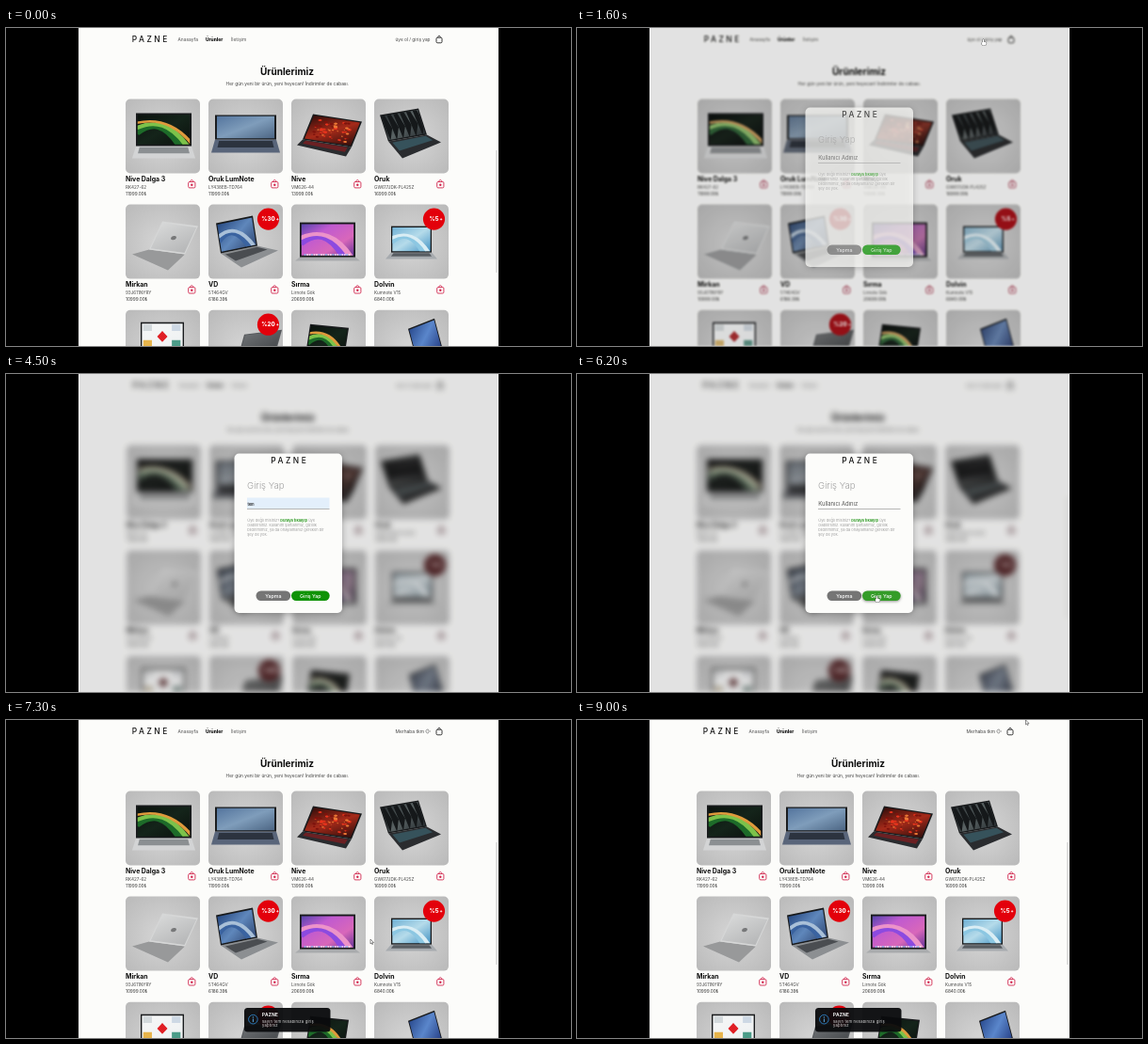
Animation of 600 by 338 pixels, one loop 10 s. Source, as an HTML page with a canvas:

```html
<!DOCTYPE html>
<html lang="tr">
<head>
<meta charset="utf-8">
<title>Ürünlerimiz</title>
<style>
html, body { margin: 0; width: 100%; height: 100%; overflow: hidden; background: #000; }
canvas { display: block; width: 600px; height: 338px; }
</style>
</head>
<body>
<canvas id="stage" width="600" height="338"></canvas>
<script>
const W = 600, H = 338, LOOP = 10000, STEP = 100;
const LEFT = 77, RIGHT = 523, PAPER = '#fcfcfa', INK = '#0c0c0c';
const BRAND = 'PAZNE', USER = 'tkm';
const view = document.getElementById('stage').getContext('2d');
const sheet = document.createElement('canvas');
sheet.width = W;
sheet.height = H;
const page = sheet.getContext('2d');

const clamp = v => Math.max(0, Math.min(1, v));
const ramp = (t, a, b) => clamp((t - a) / (b - a));
const smooth = u => u * u * (3 - 2 * u);
const easeOut = u => 1 - (1 - u) * (1 - u);
const mix = (a, b, u) => a + (b - a) * u;

function random(seed) {
  return () => (seed = seed * 16807 % 2147483647) / 2147483647;
}

function text(c, s, x, y, size, color, weight = 400, align = 'left', gap = 0) {
  c.font = `${weight} ${size}px Inter, sans-serif`;
  c.letterSpacing = gap + 'px';
  c.textAlign = align;
  c.fillStyle = color;
  c.fillText(s, x, y);
  const w = c.measureText(s).width;
  c.letterSpacing = '0px';
  return w;
}

function box(c, x, y, w, h, r, fill) {
  c.beginPath();
  c.roundRect(x, y, w, h, r);
  c.fillStyle = fill;
  c.fill();
}

function disc(c, x, y, r, fill) {
  c.beginPath();
  c.arc(x, y, r, 0, 7);
  c.fillStyle = fill;
  c.fill();
}

function poly(c, pts, fill) {
  c.beginPath();
  pts.forEach(([x, y]) => c.lineTo(x, y));
  c.closePath();
  c.fillStyle = fill;
  c.fill();
}

// Screen art is drawn in a unit square that the lid's transform places.
const swoosh = (...colors) => c => colors.forEach((color, i) => {
  c.beginPath();
  c.moveTo(0, 0.62 - i * 0.16);
  c.quadraticCurveTo(0.45 + i * 0.08, 0.05, 0.8 + i * 0.12, 1);
  c.strokeStyle = color;
  c.lineWidth = 0.15 - i * 0.04;
  c.stroke();
});

const embers = c => {
  const rnd = random(11);
  for (let i = 0; i < 60; i++) {
    const x = mix(rnd(), 0.5, 0.3), y = mix(rnd(), 0.5, 0.3);
    disc(c, x, y, 0.01 + rnd() * 0.035, ['#e8331c', '#7d120c', '#ee7a35'][i % 3]);
  }
};

const shards = c => {
  for (let i = 0; i < 6; i++) {
    const x = i / 6;
    poly(c, [[x, 0], [x + 0.1, 0], [x + 0.2, 0.55], [x + 0.06, 1]], '#15181a');
  }
};

const tiles = c => {
  const colors = ['#d3d9dc', '#cdd8e4', '#e7b44b', '#4b9c88'];
  colors.forEach((color, i) => box(c, 0.06 + i % 2 * 0.66, 0.08 + (i >> 1) * 0.5, 0.2, 0.2, 0, color));
  poly(c, [[0.5, 0.28], [0.62, 0.46], [0.5, 0.64], [0.38, 0.46]], '#e01f25');
};

const dock = c => {
  swoosh('#8c4ae0', '#ec93c9')(c);
  for (let i = 0; i < 20; i++) box(c, 0.08 + i * 0.042, 0.91, 0.03, 0.06, 0, i % 3 ? '#f2edf5' : '#7fc5ef');
};

const badge = c => disc(c, 0.5, 0.5, 0.07, '#777879');

/* x, y: left end of the hinge; w, turn: hinge vector; h, lean: lid vector;
   deck: vector to the front edge, which is wider by flare and drops by dip. */
function laptop(c, { x, y, w, h, turn = 0, lean = 0, deck, flare = 0, dip = 0,
  metal = '#2a2c2f', keys, edge = '#181a1c', screen, art, rim = 0.03 }) {
  if (deck) {
    const [dx, dy] = deck;
    const front = [[x + w + dx + flare, y + turn + dy + dip], [x + dx - flare, y + dy]];
    const back = [[x, y], [x + w, y + turn]];
    const at = (u, v) => [0, 1].map(k =>
      mix(mix(back[0][k], back[1][k], u), mix(front[1][k], front[0][k], u), v));
    poly(c, [...back, ...front], metal);
    if (keys) poly(c, [at(0.07, 0.1), at(0.93, 0.1), at(0.93, 0.6), at(0.07, 0.6)], keys);
  }
  c.save();
  c.transform(w, turn, -lean, h, x + lean, y - h);
  c.fillStyle = edge;
  c.fillRect(0, 0, 1, 1);
  c.beginPath();
  c.rect(rim, rim * 1.6, 1 - 2 * rim, 1 - 3.2 * rim);
  c.clip();
  const g = c.createLinearGradient(0, 0, 1, 1);
  screen.forEach((color, i) => g.addColorStop(i / (screen.length - 1), color));
  c.fillStyle = g;
  c.fillRect(0, 0, 1, 1);
  if (art) art(c);
  c.restore();
}

const night = ['#0b110d', '#14241a', '#0b0f0c'];
const green = swoosh('#1d6b29', '#7cc24a', '#e09a3c');

const goods = [
  { name: 'Nive Dalga 3', model: 'RK427-62', price: '11999.00₺',
    pc: { x: 11, y: 50, w: 59, h: 35, deck: [0, 13], flare: 4, metal: '#d3d4d5', keys: '#8b8f92', screen: night, art: green } },
  { name: 'Oruk LumNote', model: 'LY438EB-TD764', price: '11999.00₺',
    pc: { x: 7, y: 43, w: 65, h: 26, deck: [0, 14], flare: 4, metal: '#59657a', keys: '#2c333f', screen: ['#50719b', '#7f9dbb', '#48617f'] } },
  { name: 'Nive', model: 'VM626-44', price: '13999.00₺',
    pc: { x: 12, y: 43, w: 52, turn: 8, h: 27, lean: 11, deck: [-6, 6], dip: 4, keys: '#6b2023', screen: ['#2b0c0a', '#a52a19', '#2a0d0c'], art: embers } },
  { name: 'Oruk', model: 'GW617JDK-PL425Z', price: '16999.00₺',
    pc: { x: 15, y: 45, w: 41, turn: -7, h: 28, lean: -9, deck: [15, 18], dip: -10, keys: '#36525b', screen: ['#23292c', '#596263', '#262c30'], art: shards } },
  { name: 'Mirkan', model: '93J611NYRY', price: '10999.00₺',
    pc: { x: 25, y: 48, w: 38, turn: 5, h: 30, lean: 14, deck: [-18, 5], dip: 12, metal: '#98999a', edge: '#d6d7d7', screen: ['#d8d9d9', '#b4b5b6'], art: badge } },
  { name: 'VD', model: '5T464GV', price: '6186.39₺', sale: '%30',
    pc: { x: 13, y: 52, w: 39, turn: -8, h: 32, lean: -5, deck: [22, 15], dip: -10, metal: '#8c8f92', keys: '#4a4d51', screen: ['#24467f', '#5f87bb', '#2d4470'], art: tiles && swoosh('#3a63a0', '#a9c0d8') } },
  { name: 'Sırma', model: 'Lirnote Gök', price: '20699.00₺',
    pc: { x: 9, y: 56, w: 59, h: 37, deck: [0, 4], flare: 5, metal: '#a9abad', screen: ['#4b43a8', '#c05ad0', '#d867ba', '#5b2f95'], art: dock } },
  { name: 'Dolvin', model: 'Kumnote V15', price: '6840.00₺', sale: '%5',
    pc: { x: 18, y: 51, w: 43, h: 28, deck: [0, 7], flare: 6, metal: '#a7abaf', keys: '#585d62', screen: ['#6caed3', '#b5dbea', '#3d8fc2'], art: swoosh('#8cc7e2', '#d9edf4') } },
  { pc: { x: 16, y: 46, w: 46, h: 33, screen: ['#f6f7f7', '#eef1f2'], art: tiles } },
  { sale: '%20', pc: { x: 32, y: 48, w: 40, turn: -5, h: 22, lean: 6, edge: '#55585b', screen: ['#6d7073', '#45484b'] } },
  { pc: { x: 15, y: 48, w: 41, turn: 4, h: 33, lean: 5, screen: night, art: green } },
  { pc: { x: 44, y: 50, w: 28, turn: -11, h: 30, lean: -8, screen: ['#28488b', '#5a86cb', '#263f85'] } }
];

function bag(c, x, y, w, h, color) {
  c.strokeStyle = color;
  c.lineWidth = 0.9;
  c.beginPath();
  c.roundRect(x, y, w, h, 1.2);
  c.moveTo(x + w * 0.28, y);
  c.bezierCurveTo(x + w * 0.28, y - 2.6, x + w * 0.72, y - 2.6, x + w * 0.72, y);
  c.stroke();
}

function card(c, { name, model, price, sale, pc }, i) {
  c.save();
  c.translate(127 + i % 4 * 88, 75.5 + Math.floor(i / 4) * 112.1);
  const g = c.createRadialGradient(39, 42, 8, 39, 40, 56);
  g.addColorStop(0, '#d2d2d2');
  g.addColorStop(1, '#b9b9b9');
  box(c, 0, 0, 79, 79, 5, g);
  c.save();
  c.beginPath();
  c.rect(0, 0, 79, 79);
  c.clip();
  laptop(c, pc);
  c.restore();
  if (sale) {
    disc(c, 63.5, 15.5, 11.6, '#e3000b');
    const wide = text(c, sale, 63.5, 17.6, 6, '#fff', 800, 'center', 0.1);
    text(c, '+', 64.5 + wide / 2, 17.4, 4.6, '#fff', 800);
  }
  if (name) {
    text(c, name, 0, 87.6, 6.9, INK, 700);
    text(c, model, 0, 95.4, 4.6, '#444');
    text(c, price, 0, 102.3, 4.7, '#333');
    bag(c, 66.7, 88, 7.2, 6.4, '#d2274f');
    disc(c, 70.3, 91.2, 1.2, '#d2274f');
  }
  c.restore();
}

function drawPage(t) {
  const c = page;
  const locked = t >= 1500 && t < 6200;
  c.fillStyle = PAPER;
  c.fillRect(0, 0, W, H);
  c.save();
  c.translate(locked ? 1 : 0, 0);
  text(c, BRAND, 133.8, 15.2, 8.4, '#151515', 500, 'left', 2.5);
  text(c, 'Anasayfa', 182.5, 14.2, 4.9, '#555');
  text(c, 'Ürünler', 212, 14.2, 4.9, INK, 800);
  text(c, 'İletişim', 239, 14.2, 4.9, '#555');
  if (t >= 6400) {
    text(c, 'Merhaba ' + USER, 413.5, 14.2, 4.9, '#444');
    c.strokeStyle = '#555';
    c.lineWidth = 0.6;
    c.beginPath();
    c.arc(447.8, 12, 1.9, 0.9, 5.4);
    c.moveTo(447.8, 12);
    c.lineTo(451, 12);
    c.stroke();
  } else {
    text(c, 'üye ol / giriş yap', 413.5, 14.2, 4.75, '#444');
  }
  bag(c, 457, 10.2, 6, 5.6, '#222');
  text(c, 'Ürünlerimiz', 298.5, 49.9, 10, INK, 700, 'center');
  text(c, 'Her gün yeni bir ürün, yeni heyecan! İndirimler de cabası.', 298.8, 60.5, 4.85, '#444', 400, 'center');
  goods.forEach((item, i) => card(c, item, i));
  c.restore();
  if (!locked) box(c, 520.5, 130, 1, 130, 0.5, '#c4c4c4');
}

function drawField(c, t) {
  if (t >= 4200 && t < 5900) {
    const picked = t >= 4800;
    c.fillStyle = '#e3effb';
    c.fillRect(256, 131.5, 87.5, 11.5);
    text(c, USER, 256.5, 139.5, picked ? 5.8 : 3.9, '#222', picked ? 400 : 600);
  } else {
    text(c, 'Kullanıcı Adınız', 256.2, 139.6, 5.9, '#555');
    const blink = t >= 3300 && t < 3500;
    if (t >= 2600 && t < 4200 && !blink) box(c, 256, 133.5, 0.8, 7.5, 0, '#222');
  }
  c.fillStyle = '#999';
  c.fillRect(256, 143, 87.5, 0.7);
}

function button(c, label, x, w, fill, raised) {
  c.save();
  if (raised) {
    c.shadowColor = 'rgba(0,0,0,.4)';
    c.shadowBlur = 3;
    c.shadowOffsetY = 1;
  }
  box(c, x, 230.5, w, 10.5, 5.2, fill);
  c.restore();
  text(c, label, x + w / 2, 237.8, 5.3, '#fff', 500, 'center');
}

function drawModal(c, t) {
  c.save();
  c.shadowColor = 'rgba(0,0,0,.3)';
  c.shadowBlur = 7;
  c.shadowOffsetY = 1;
  box(c, 242.5, 84.5, 114.5, 169.5, 5, PAPER);
  c.restore();
  text(c, BRAND, 281.3, 95.2, 8.4, '#151515', 500, 'left', 2.5);
  text(c, 'Giriş Yap', 256, 122.3, 9.6, '#a2a2a2', 300);
  drawField(c, t);
  const pale = '#a0a0a0';
  const w = text(c, 'Üye değil misiniz? ', 256.2, 157, 4, pale);
  const v = text(c, 'buraya tıklayıp', 256.2 + w, 157, 4, '#2f9a25', 700);
  text(c, ' üye', 256.2 + w + v, 157, 4, pale);
  ['olabilirsiniz. kullanım şartlarımız, gizlilik', 'bildirimimiz, ya da onaylamanız gereken bir', 'şey de yok.']
    .forEach((s, i) => text(c, s, 256.2, 162.1 + i * 5.1, 4, pale));
  const hover = t >= 5700;
  button(c, 'Yapma', 265.5, 36.7, '#757575');
  button(c, 'Giriş Yap', 303, 40.7, hover ? '#349c28' : '#109307', hover);
}

function drawToast(c, t) {
  const k = easeOut(ramp(t, 6500, 7000));
  if (!k) return;
  c.save();
  c.globalAlpha = k;
  c.translate(0, (1 - k) * 30);
  box(c, 253, 306, 91.5, 25.5, 3.5, 'rgba(10,11,13,.95)');
  c.strokeStyle = '#2f82c8';
  c.lineWidth = 0.9;
  c.beginPath();
  c.arc(262.4, 318.2, 4.8, 0, 7);
  c.stroke();
  disc(c, 262.4, 315.9, 0.7, '#5aa5e0');
  box(c, 261.9, 317.4, 1, 3.6, 0.3, '#5aa5e0');
  text(c, BRAND, 272, 314.6, 4.7, '#fff', 700, 'left', 0.3);
  text(c, `sayın ${USER} hesabınıza giriş`, 272, 321.5, 4.1, '#d8d8d8', 400, 'left', 0.2);
  text(c, 'yaptınız', 272, 326, 4.1, '#d8d8d8', 400, 'left', 0.2);
  c.restore();
}

// Pointer moves: start and end time, then from and to
const moves = [
  [300, 800, [480, 30], [431, 12]],
  [1600, 2500, [431, 12], [300, 138]],
  [4800, 5800, [300, 141], [318, 236]],
  [6300, 7300, [318, 236], [387, 233]],
  [7500, 8500, [387, 233], [486, 14]],
  [8600, 9000, [486, 14], [476.5, 0]]
];

function drawPointer(c, t) {
  const move = moves.filter(m => m[0] <= t).pop();
  const inField = t >= 2600 && t < 4800;
  if (!move || inField) return;
  const [from, till, a, b] = move;
  const u = smooth(ramp(t, from, till));
  const hand = (t >= 700 && t <= 1600) || (t >= 5700 && t <= 6300);
  c.save();
  c.translate(mix(a[0], b[0], u), mix(a[1], b[1], u));
  c.strokeStyle = '#444';
  c.lineWidth = 0.9;
  c.lineJoin = 'round';
  if (hand) {
    c.beginPath();
    c.roundRect(-0.2, 0, 1.3, 4.5, 0.6);
    c.roundRect(-1, 2.8, 4.6, 3.6, 1.3);
    c.stroke();
    c.fillStyle = '#fff';
    c.fill();
  } else {
    poly(c, [[0, 0], [0, 4.9], [1.1, 3.9], [1.9, 5.6], [2.7, 5.2], [2, 3.6], [3.5, 3.5]], '#fff');
    c.lineWidth = 0.6;
    c.stroke();
  }
  c.restore();
}

function draw(t) {
  drawPage(t);
  const c = view;
  const open = easeOut(ramp(t, 1500, 1900)) * (1 - smooth(ramp(t, 6300, 6900)));
  c.fillStyle = '#000';
  c.fillRect(0, 0, W, H);
  c.save();
  c.beginPath();
  c.rect(LEFT, 0, RIGHT - LEFT, H);
  c.clip();
  c.fillStyle = PAPER;
  c.fillRect(LEFT, 0, RIGHT - LEFT, H);
  if (open) c.filter = `blur(${3 * open}px) grayscale(${0.8 * open})`;
  c.drawImage(sheet, 0, 0);
  c.filter = 'none';
  c.fillStyle = `rgba(0,0,0,${0.1 * clamp(open * 2.4)})`;
  c.fillRect(LEFT + 1, 0, RIGHT - LEFT - 2, H);
  if (open) {
    c.globalAlpha = clamp(open * 1.7);
    drawModal(c, t);
    c.globalAlpha = 1;
  }
  drawToast(c, t);
  drawPointer(c, t);
  c.restore();
}

const start = performance.now();
let last = -1;
function tick() {
  const t = Math.floor((performance.now() - start) % LOOP / STEP) * STEP;
  if (t !== last) draw(last = t);
  requestAnimationFrame(tick);
}
tick();
</script>
</body>
</html>
```
